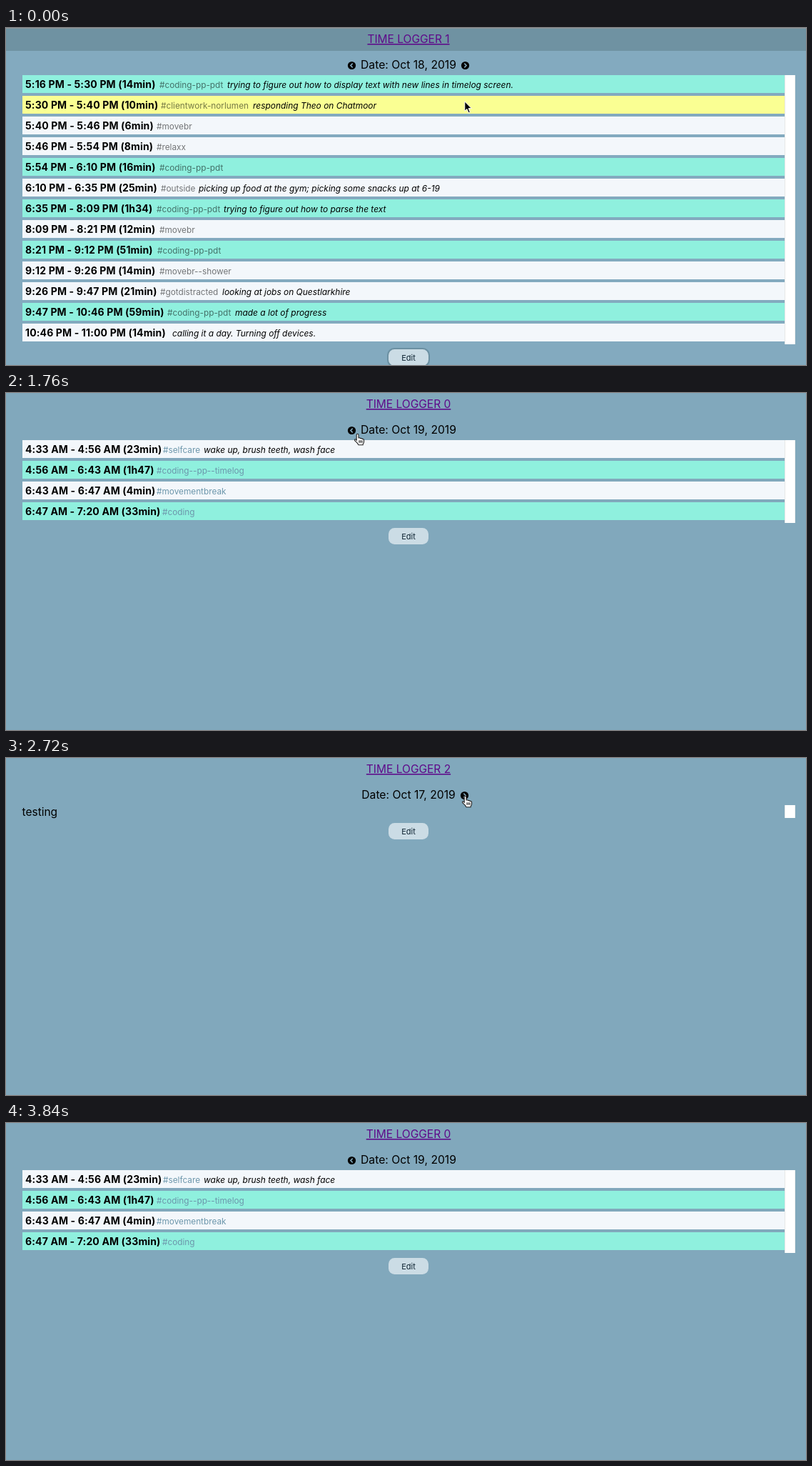
An HTML page for the animation above (4 s loop, 1121 by 472 pixels).

```html
<!DOCTYPE html>
<html lang="en">
<head>
<meta charset="utf-8">
<title>Time Logger</title>
<style>
html, body { margin: 0; height: 100%; overflow: hidden; background: #82a8bc; }
svg { display: block; width: 1121px; height: 472px; font-family: Inter, Roboto, sans-serif; }
text { white-space: pre; }
.title { font-size: 15.5px; fill: #5e0a8a; text-anchor: middle; text-decoration: underline; }
.date { font-size: 15.7px; text-anchor: middle; }
.plain { font-size: 15.5px; }
.time { font-size: 14px; font-weight: 700; letter-spacing: .14px; }
.tag { font-size: 11.8px; }
.note { font-size: 11.95px; font-style: italic; }
.edit { font-size: 11px; fill: #0c2230; text-anchor: middle; }
</style>
</head>
<body>
<svg id="stage" viewBox="0 0 1121 472"></svg>
<script>
const MINT = '#8ff0de', YELLOW = '#faff93', PALE = '#f3f7fb';
const STEP = 160, LOOP = 4000;

const rect = (x, y, w, h, fill, more = '') =>
  `<rect x="${x}" y="${y}" width="${w}" height="${h}" fill="${fill}" ${more}/>`;
const text = (cls, x, y, s, more = '') => `<text class="${cls}" x="${x}" y="${y}" ${more}>${s}</text>`;

// Round button with a chevron; dir is -1 for left, 1 for right
const arrowButton = (x, dir, bg) =>
  `<circle cx="${x}" cy="52.5" r="5.6"/>
   <path d="M${x - dir * 1.2} 49.6l${dir * 2.8} 2.9l${-dir * 2.8} 2.9" fill="none" stroke="${bg}" stroke-width="1.6"/>`;

const scrollTrack = h =>
  rect(1091, 66, 15, h, '#fff') + rect(1091, 66, 1, h, '#e7e7e7') + rect(1105, 66, 1, h, '#ededed');

const editButton = (y, framed) =>
  (framed ? rect(534, y - 2, 60, 27, '#6b90a2', 'rx="10"') : '') +
  rect(536, y, 56, 23, '#cbdce5', 'rx="8.5"') + text('edit', 564, y + 16, 'Edit');

// Row: colour, time span, tag x, tag, note x, note
const row = ([fill, time, tagX, tag, noteX, note], i, tagFill) => {
  const y = 66 + i * 29;
  return rect(23, y, 1068, 25, fill) + text('time', 27, y + 18, time) +
    (tag ? text('tag', tagX, y + 18, tag, tagFill) : '') +
    (note ? text('note', noteX, y + 18, note) : '');
};

const page = ({ n, day, bg, tagFill, rows, band, prev, next }) => {
  const end = rows ? 66 + rows.length * 29 : 84;
  return `<g id="day${day}">` + rect(0, 0, 1121, 472, bg) +
    (band ? rect(0, 0, 1121, 32, '#6f92a2') + rect(0, 0, 1121, 1, '#8b979c') : '') +
    text('title', 564, 21, 'TIME LOGGER ' + n) +
    text('date', 564, 57, `Date: Oct ${day}, 2019`) +
    (prev ? arrowButton(prev, -1, bg) : '') + (next ? arrowButton(next, 1, bg) : '') +
    (rows ? rows.map((r, i) => row(r, i, tagFill)).join('') : text('plain', 22.5, 80.5, 'testing')) +
    scrollTrack(end - 66) + editButton(end + 7, band) + '</g>';
};

const pages = [
  { n: 1, day: 18, bg: '#83aabf', band: true, prev: 484.5, next: 643.5, tagFill: 'fill-opacity=".53"', rows: [
    [MINT, '5:16 PM - 5:30 PM (14min)', 215, '#coding-pp-pdt', 310, 'trying to figure out how to display text with new lines in timelog screen.'],
    [YELLOW, '5:30 PM - 5:40 PM (10min)', 217, '#clientwork-norlumen', 346, 'responding Theo on Chatmoor'],
    [PALE, '5:40 PM - 5:46 PM (6min)', 211, '#movebr'],
    [PALE, '5:46 PM - 5:54 PM (8min)', 211, '#relaxx'],
    [MINT, '5:54 PM - 6:10 PM (16min)', 215, '#coding-pp-pdt'],
    [PALE, '6:10 PM - 6:35 PM (25min)', 217, '#outside', 270, 'picking up food at the gym; picking some snacks up at 6-19'],
    [MINT, '6:35 PM - 8:09 PM (1h34)', 211, '#coding-pp-pdt', 305, 'trying to figure out how to parse the text'],
    [PALE, '8:09 PM - 8:21 PM (12min)', 215, '#movebr'],
    [MINT, '8:21 PM - 9:12 PM (51min)', 212, '#coding-pp-pdt'],
    [PALE, '9:12 PM - 9:26 PM (14min)', 215, '#movebr--shower'],
    [PALE, '9:26 PM - 9:47 PM (21min)', 216, '#gotdistracted', 303, 'looking at jobs on Questlarkhire'],
    [MINT, '9:47 PM - 10:46 PM (59min)', 226, '#coding-pp-pdt', 321, 'made a lot of progress'],
    [PALE, '10:46 PM - 11:00 PM (14min)', 0, '', 233, 'calling it a day. Turning off devices.'],
  ] },
  { n: 0, day: 19, bg: '#81a8bc', prev: 484.5, tagFill: 'fill="#6c96ab"', rows: [
    [PALE, '4:33 AM - 4:56 AM (23min)', 220, '#selfcare', 277, 'wake up, brush teeth, wash face'],
    [MINT, '4:56 AM - 6:43 AM (1h47)', 211, '#coding--pp--timelog'],
    [PALE, '6:43 AM - 6:47 AM (4min)', 211, '#movementbreak'],
    [MINT, '6:47 AM - 7:20 AM (33min)', 219, '#coding'],
  ] },
  { n: 2, day: 17, bg: '#81a8bc', next: 642.5 },
];

const pointers = `
  <g id="ring" fill="none"><circle cx="8" cy="8" r="16" stroke="#222" stroke-width="3"/>
    <circle cx="8" cy="8" r="15.8" stroke="#fff" stroke-width="1.6"/></g>
  <path id="hand" fill="#fff" stroke="#222" stroke-width="1.1" stroke-linejoin="round" d="M3.2 8.6V1.7a1.4 1.4 0 0 1 2.8 0V6
    q2.3-.7 2.5.6q2.2-.5 2.4.8q2.4-.3 2.6 1.2v3q-.3 1.8-1.3 2.8v1.3H5.8q-.5-1.5-2-3L.7 9.6q-.6-1.5.7-1.8q1 0 1.8 1.6z
    M7 9.3v3.4M9 9.3v3.4M11 9.3v3.4"/>
  <path id="arrow" stroke="#fff" stroke-linejoin="round"
    d="M.8 1V14.2L3.9 11.4L6.1 16.8L8.3 15.9L6.1 10.6H10.2z"/>
  <path id="beam" fill="none" stroke="#222" d="M.5.5h2l1.5 1l1.5-1h2M4 1.5v13M.5 15.5h2l1.5-1l1.5 1h2"/>`;

// Pointer at each step
const moves = [
  ['arrow', 642, 102], ['arrow', 639, 94], ['arrow', 640, 67], ['hand', 639, 64], ['hand', 638, 58],
  ['hand', 638, 53], ['hand', 638, 55], ['beam', 557, 49], ['beam', 506, 50], ['beam', 496, 50],
  ['hand', 487, 60], ['hand', 488, 57], ['hand', 487, 57], ['hand', 486, 56], ['hand', 492, 54],
  ['beam', 625, 40], ['hand', 637, 52], ['hand', 639, 53], ['hand', 640, 55], ['hand', 641, 54],
  ['arrow', 633, 60], ['arrow', 730, 390], ['arrow', 716, 426], ['arrow', 671, 466], ['', 0, 0],
];
const clicks = [3, 13, 19];
const days = [[20, 19], [18, 18], [14, 17], [12, 18], [6, 19], [0, 18]];
const focusX = { 4: 469.5, 5: 469.5, 12: 469.5, 13: 469.5, 18: 628.5, 19: 628.5 };

const stage = document.getElementById('stage');
stage.innerHTML = pages.map(page).join('') +
  rect(0, 42.5, 29.5, 20.5, 'none', 'id="focus" rx="2" stroke="#4a93e0" stroke-width="3"') +
  `<g id="pointer">${pointers}</g>`;
const el = id => document.getElementById(id);
const show = (id, on) => { el(id).style.display = on ? '' : 'none'; };

function draw(now) {
  const i = Math.floor((now % LOOP) / STEP);
  const day = days.find(([from]) => i >= from)[1];
  for (const p of pages) show('day' + p.day, p.day === day);
  show('focus', i in focusX);
  el('focus').setAttribute('x', focusX[i] || 0);
  const [kind, x, y] = moves[i];
  for (const k of ['hand', 'arrow', 'beam']) show(k, k === kind);
  show('ring', clicks.includes(i));
  el('pointer').setAttribute('transform', `translate(${x} ${y})`);
}

let start;
function tick(now) {
  start ??= now;
  draw(now - start);
  requestAnimationFrame(tick);
}
draw(0);
requestAnimationFrame(tick);
</script>
</body>
</html>
```
